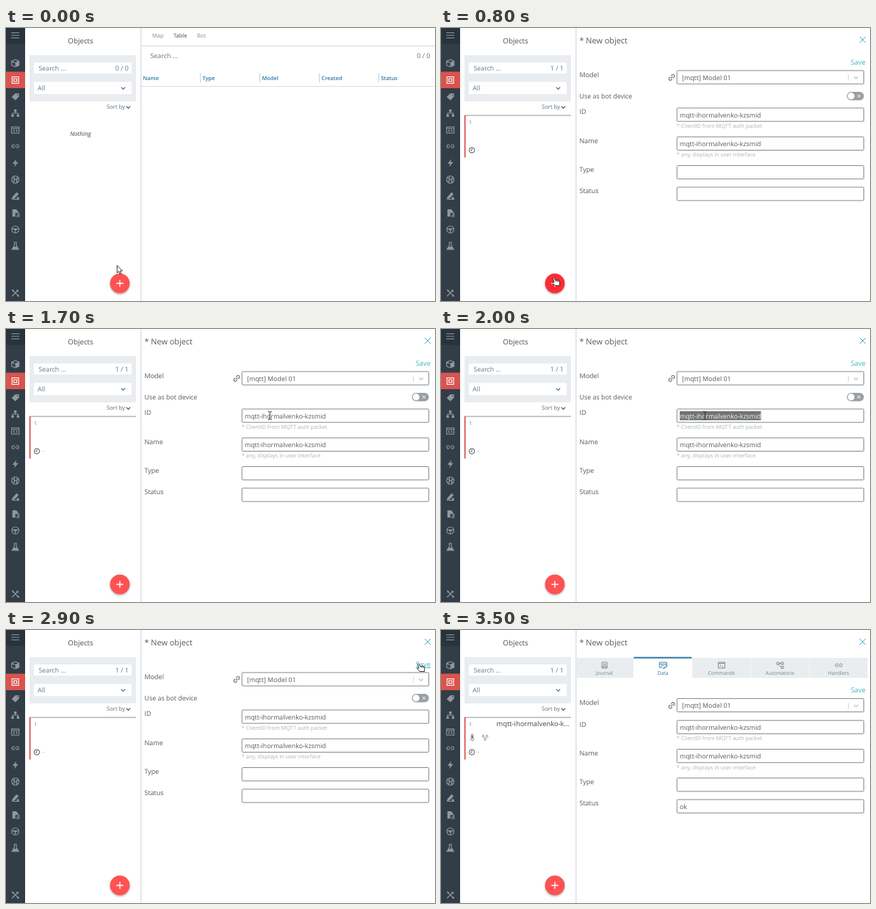
An HTML page that plays this animation: 584x372 px, repeating every 3600 ms.

```html
<!DOCTYPE html>
<html lang="en">
<head>
<meta charset="utf-8">
<title>New object</title>
<style>
html, body { margin: 0; width: 100%; height: 100%; overflow: hidden; background: #fff; }
svg { display: block; font-family: "Open Sans", "Noto Sans", sans-serif; text-rendering: geometricPrecision; }
text { white-space: pre; }
</style>
</head>
<body>
<svg id="stage" width="584" height="372" viewBox="0 0 584 372"></svg>
<script>
const LOOP = 3600;
const USER = 'ihormalvenko', PARTS = ['mqtt-', USER, '-kzsmid'], NAME = PARTS.join('');
const INK = '#56595c', SLATE = '#5f7885', CYAN = '#3fb5c6', BLUE = '#2b7aa3', PALE = '#e9edf0';

// cy is the middle of the capital letters
const text = (x, cy, s, size, fill = INK, attrs = '') =>
  `<text x="${x}" y="${cy + size * .36}" font-size="${size}" fill="${fill}" ${attrs}>${s}</text>`;
const rect = (x, y, w, h, fill, attrs = '') =>
  `<rect x="${x}" y="${y}" width="${w}" height="${h}" fill="${fill}" ${attrs}/>`;
const line = (d, stroke, w = 1, attrs = '') =>
  `<path d="${d}" fill="none" stroke="${stroke}" stroke-width="${w}" ${attrs}/>`;
const at = (x, y, body, attrs = '') => `<g transform="translate(${x} ${y})" ${attrs}>${body}</g>`;
const group = (id, body) => `<g id="${id}">${body}</g>`;
const chevron = (x, y, color) => at(x, y, line('M-2.7-1.3L0 1.4L2.7-1.3', color, 1.1));
const MID = 'text-anchor="middle"', END = 'text-anchor="end"';

const LINK = 'M-1 2H-2.7A2 2 0 0 1-2.7-2H-1M1-2H2.7A2 2 0 0 1 2.7 2H1M-2 0H2';

// Sidebar icons: [y, stroked path, filled path]
const ICONS = [
  [10, 'M-5.5-3.5H5.5M-5.5 0H5.5M-5.5 3.5H5.5', ''],
  [48, 'M0-5L5-2.8V2.8L0 5L-5 2.8V-2.8ZM-5-2.8L0-.6L5-2.8', 'M0-.6L5-2.8V2.8L0 5Z'],
  [71, 'M-4.5-4.5H4.5V4.5H-4.5ZM-2-2H2V2H-2Z', ''],
  [93.5, '', 'M-5 .5L0-4.5H5V0L0 5ZM3-3.3A.8.8 0 1 0 3-1.7A.8.8 0 1 0 3-3.3'],
  [116, 'M0-2V0M-3.7 2V0H3.7V2', 'M-1.7-5H1.7V-1.8H-1.7ZM-5.3 1.7H-2V5H-5.3ZM2 1.7H5.3V5H2Z'],
  [139, 'M-5-4.3H5V4.3H-5ZM-5-2.3H5M-1-.8L-2.5 1L-1 2.7M1-.8L2.5 1L1 2.7', ''],
  [161, LINK, ''],
  [184, '', 'M1.5-5.5L-4 1H-.5L-1.5 5.5L4-1.3H.5Z'],
  [206.5, 'M-5 0A5 5 0 1 1 5 0A5 5 0 1 1-5 0M-3.8-2.8L3.5 3.3M-1-4.8L-2 4.5M4.7-1.5L-4.5 2M2.5-4.3L1.5 4.7', ''],
  [229, 'M-4.7 4.5L3-4.5M-3 4.5H5', 'M-5 4.8L-3.8 1L1.5-5L4.5-2.5L-1 3.2ZM2 4.8V1.5H5V4.8Z'],
  [252, 'M2 0H5V5H1', 'M-4-5H1L3.5-2.5V0H0V5H-4ZM2 2H4V3.5H2Z'],
  [274.5, 'M-4.8 0A4.8 4.8 0 1 1 4.8 0A4.8 4.8 0 1 1-4.8 0M-4.5-.7H4.5M0 0V4.5', 'M-2-1.3H2V1H-2Z'],
  [297, 'M-2-5H2M-1.3-5V-1L-4.5 4.7H4.5L1.3-1V-5', 'M-2.4 1H2.4L4.5 4.7H-4.5Z'],
  [361, 'M-4.5 4.5L4-4M-4-4L4.7 4.7', 'M-5-5L-1.5-3.5L-3.5-1.5ZM2-5L5-2L3-1.5L1.5-3ZM2 3.5L3.5 2L5.5 4L4 5.5Z'],
];

const sidebar = rect(0, 0, 26, 372, '#323d47') + rect(0, 0, 26, 22, '#28333c') + rect(0, 59.5, 26, 22.5, '#d9534f') +
  ICONS.map(([y, stroke, fill]) => {
    const color = y === 71 ? '#fff' : '#8d989f';
    return at(12.7, y, line(stroke, color, 1.1) + `<path d="${fill}" fill="${color}" fill-rule="evenodd"/>`);
  }).join('');

const panel = rect(183, 0, 1.6, 372, '#dfe2e4') +
  text(101.5, 17.5, 'Objects', 9.8, '#4c4f52', MID) +
  rect(32, 37, 145, 63, PALE) + rect(38, 47, 133, 15, '#fff', 'rx="1"') + rect(38, 73.5, 133, 16.5, '#fff', 'rx="1"') +
  text(44.5, 55, 'Search ...', 8.8, SLATE) +
  text(167, 55, '<tspan id="count"></tspan>', 9, SLATE, END) +
  text(43, 82, 'All', 9, SLATE) + chevron(159.5, 82, '#4a6472') +
  text(137, 107.5, 'Sort by', 7.7, '#666a6d') + chevron(166.5, 108, '#45484b');

const COLUMNS = ['Name', 'Type', 'Model', 'Created', 'Status'];
const table = group('table',
  text(101.5, 144.5, 'Nothing', 8.2, '#3c4a54', MID + ' font-style="italic" font-weight="500"') +
  text(199, 10.3, 'Map', 7.5, '#858a8e') + text(228, 10.3, 'Table', 7.5, '#45494c') + text(260, 10.3, 'Bot', 7.5, '#858a8e') +
  rect(184, 23.5, 400, 2.2, '#e7e9ea') +
  text(196.5, 38, 'Search ...', 8.9, '#6b6f72') + text(577.5, 38, '0 / 0', 9, '#6b6f72', END) +
  COLUMNS.map((s, i) => text(186.5 + 81 * i, 68, s, 7.4, BLUE, 'font-weight="600"') +
    (i ? rect(183 + 81 * i, 61.5, 1, 13, '#c9cfd3') : '')).join('') +
  rect(184, 79, 400, 1, '#dcdfe1'));

const card = group('card',
  rect(32, 118.6, 145, 1, '#8f9396') + rect(31.7, 119, 1.8, 57.5, '#d9534f') +
  text(38, 128.5, '1', 7, '#6d7174') +
  at(42, 166.5, '<circle r="3.7" fill="none" stroke="#4b4e50"/>' + line('M0-2.3V.3H-2', '#4b4e50', .9)) +
  text(49.5, 166, '-', 8, '#8a8e91') +
  group('details',
    text(175, 128, NAME.slice(0, 19) + '...', 9.4, '#45484b', END) +
    at(42.5, 146, line('M-1.1 1V-3A1.1 1.1 0 0 1 1.1-3V1A2 2 0 1 1-1.1 1M0-2V2.5', '#696d70', .9)) +
    [[57.5, 144.5], [62.5, 144.5], [60, 148.5]].map(([x, y]) =>
      at(x, y, line('M0-1.8C2 1 1.2 1.8 0 1.8S-2 1 0-1.8', '#696d70', .8))).join('')));

const field = y => rect(321.2, y + .2, 254.4, 18.2, '#fff', 'stroke="#85898c" rx="1.2"');
const entry = (y, label, value = '', hint = '') =>
  text(188.5, y + 5.3, label, 9) + field(y) + text(325, y + 9.6, value, 8.8, INK) +
  text(320.8, y + 24.7, hint, 7.4, '#aeb2b5');

function form(id, top, first, idValue, status) {
  return group(id,
    text(188.5, top + 5.5, 'Model', 9) + field(top) + text(328, top + 9.8, '[mqtt] Model 01', 8.9) +
    at(314, top + 9.5, line(LINK, '#66696c', 1.1), 'transform-origin="0 0"').replace('<path', '<path transform="rotate(-45)"') +
    rect(554, top + 6, 1, 8, '#d3d6d8') + chevron(565, top + 10, '#b9bdc0') +
    text(578, top - 11.3, `<tspan id="${id}Save">Save</tspan>`, 9.4, CYAN, END) +
    entry(first, 'ID', idValue, '* ClientID from MQTT auth packet') +
    entry(first + 39.3, 'Name', NAME, '* any, displays in user interface') +
    entry(first + 78.5, 'Type') + entry(first + 107.9, 'Status', status));
}

const TABS = [
  ['Journal', 'M-3.5-4H3.5V4H-3.5ZM-2-1.5H2M-2 .5H2M-3.5 2.3H3.5'],
  ['Data', 'M-5-4H5V1M-5-4V3H-1M-5-1.5H5M-3 .7H1M0 4.5L4.5 0L5.5 1.3L1.5 4.7Z'],
  ['Commands', 'M-4.5-4H4.5V4H-4.5ZM-4.5-2.5H4.5M-2.5-.8L-1 .5L-2.5 1.8M0 2H2.5'],
  ['Automatons', 'M-4.5-4H-1.5V-1H-4.5ZM1.5-4H4.5V-1H1.5ZM1.5 1.5H4.5V4.3H1.5ZM-1.5-2.5H1.5M-2-1L1.5 2.7'],
  ['Handlers', LINK],
];
const tabs = group('tabs', TABS.map(([s, icon], i) => {
  const x = 182.6 + 79.7 * i, on = i === 1, color = on ? BLUE : '#7d8386';
  return rect(x + (i ? 0 : 2), 38, i ? 79.2 : 77.2, 27.3, on ? '#fff' : PALE) +
    (on ? rect(x, 36.7, 79, 2, BLUE) : '') +
    at(x + 40, 48, line(icon, color, .9)) +
    text(x + 39.8, 59, s, 6.85, on ? BLUE : '#7d8386', MID + ' font-weight="500"');
}).join(''));

const selectable = `<tspan id="words">${PARTS.map(s => `<tspan>${s}</tspan>`).join('')}</tspan>`;
const editor = group('editor',
  text(188.5, 17.3, '* New object', 10.9, '#55585b') +
  at(574, 16, line('M-4-4L4 4M4-4L-4 4', CYAN, 1)) + tabs +
  form('draft', 57.8, 108.8, selectable, '') + form('saved', 93.2, 123, NAME, 'ok') +
  group('bot', text(188.5, 92.8, 'Use as bot device', 8.9) +
    rect(552.5, 87, 23.2, 11.4, '#999fa3', 'rx="5.7"') + '<circle cx="558.3" cy="92.7" r="4.6" fill="#fff"/>' +
    at(569, 92.7, line('M-2-2L2 2M2-2L-2 2', '#fff', 1))));

const button = '<circle cx="155" cy="349.5" r="13.3" fill="#000" opacity=".3" filter="url(#blur)"/>' +
  '<circle id="fab" cx="155" cy="348" r="13.4"/>' + line('M150.3 348H159.7M155 343.3V352.7', '#fff', 1.3);

const CURSORS = {
  arrow: '<path d="M.5.5V10.7L2.8 8.6L4.5 12.4L6.2 11.6L4.5 8H7.8Z" fill="#fff" stroke="#222" stroke-width=".9"/>',
  hand: '<path d="M-1.8.8Q-.7-.4.2.8L1.4 4L5.6 3.6Q7.3 4 7.4 6V11H.8L-2.4 7.2Q-2.6 5.8-1 6.2L-.2 6.8Z" fill="#fff" stroke="#222" stroke-width=".9"/>' +
    line('M2.8 4.2V6M4.5 4V6M6 4.2V6', '#222', .7),
  beam: line('M-2.5-5.5Q0-5.5 0-4.3Q0-5.5 2.5-5.5M0-4.5V4.5M-2.5 5.5Q0 5.5 0 4.3Q0 5.5 2.5 5.5', '#333', 1),
};

const stage = document.getElementById('stage');
stage.innerHTML = '<filter id="blur" x="-50%" y="-50%" width="200%" height="200%"><feGaussianBlur stdDeviation="1.6"/></filter>' +
  rect(0, 0, 584, 372, '#fff') + sidebar + panel + table + card + editor + button +
  group('cursor', Object.entries(CURSORS).map(([id, s]) => group(id, s)).join(''));

const $ = id => document.getElementById(id);
const show = (id, on) => $(id).style.display = on ? '' : 'none';

// The selection highlight sits right under the ID text
const idText = $('words').parentNode;
idText.insertAdjacentHTML('beforebegin', rect(0, 112, 0, 12.3, '#707477', 'id="mark"'));

function select(from, to) {
  [...$('words').children].forEach((word, i) => word.setAttribute('fill', i >= from && i < to ? '#f4f4f4' : INK));
  const chars = n => PARTS.slice(0, n).join('').length;
  const start = from ? idText.getSubStringLength(0, chars(from)) : 0;
  const width = to > from ? idText.getSubStringLength(chars(from), chars(to) - chars(from)) : 0;
  $('mark').setAttribute('x', 325 + start);
  $('mark').setAttribute('width', width);
}

// Pointer stops: [ms, x, y, shape]
const PATH = [
  [0, 150.7, 323, 'arrow'], [200, 152, 322, 'arrow'], [400, 153, 331, 'arrow'], [500, 154, 338, 'hand'], [600, 154.2, 340, 'hand'],
  [1000, 165, 331, 'arrow'], [1100, 285, 240, 'arrow'], [1200, 371, 172, 'arrow'], [1300, 365.5, 154, 'beam'],
  [1400, 365.5, 145, 'beam'], [1500, 365, 137.5, 'beam'], [1600, 362, 125, 'beam'], [1700, 359.2, 118, 'beam'],
  [2200, 410, 101, 'arrow'], [2300, 458, 79.5, 'arrow'], [2600, 475, 73, 'arrow'], [2700, 530, 55, 'arrow'],
  [2800, 562.3, 45.5, 'hand'], [3000, 562.2, 46.3, 'arrow'], [3300, 300, 26, 'arrow'], [3400, 13, 0, 'arrow'], [3500, 0, 0, ''],
];

function draw(t) {
  const editing = t >= 800, saved = t >= 3000;
  show('table', !editing);
  show('card', editing);
  show('editor', editing);
  show('details', saved);
  show('tabs', saved);
  show('saved', saved);
  show('draft', !saved);
  show('bot', !saved);
  $('count').textContent = editing && !(saved && t < 3100) ? '1 / 1' : '0 / 0';
  $('fab').setAttribute('fill', t >= 600 && t < 1000 ? '#ff2a33' : t >= 500 && t < 1100 ? '#ff3e43' : '#ff5252');
  $('draftSave').setAttribute('text-decoration', t >= 2800 ? 'underline' : 'none');
  $('savedSave').setAttribute('text-decoration', t < 3100 ? 'underline' : 'none');
  if (editing && !saved) {
    if (t >= 2900 || t < 1900) select(0, 0);
    else if (t < 2000) select(1, 2);
    else select(0, 3);
  }
  const [, x, y, shape] = PATH.findLast(p => p[0] <= t);
  $('cursor').setAttribute('transform', `translate(${x} ${y})`);
  for (const id in CURSORS) show(id, id === shape);
}

const begin = performance.now();
function tick() {
  draw((performance.now() - begin) % LOOP);
  requestAnimationFrame(tick);
}
tick();
</script>
</body>
</html>
```
